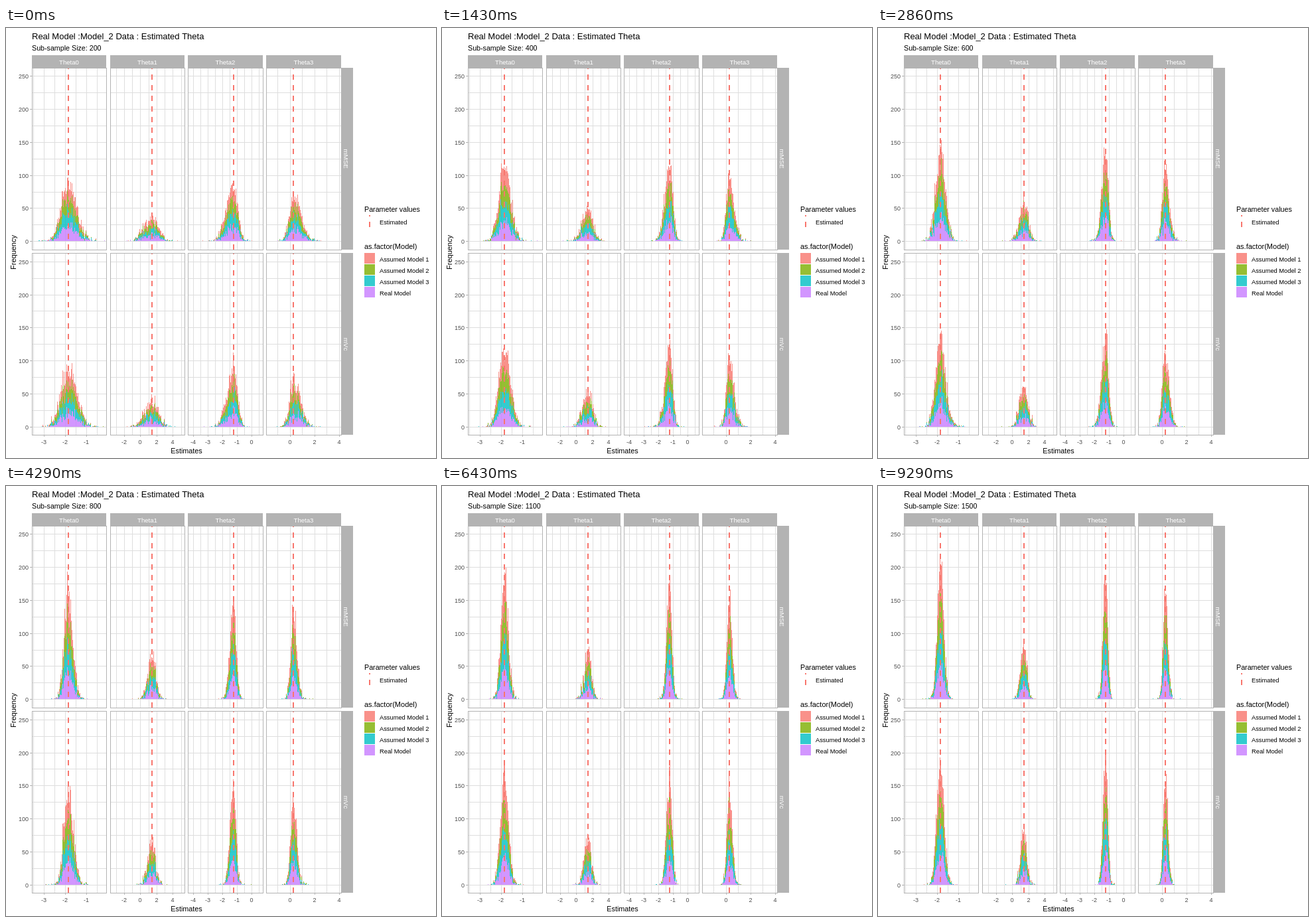
These frames come from a looping animation (648x648 px, 10000 ms). An HTML page with a canvas:

```html
<!DOCTYPE html>
<html lang="en">
<head>
<meta charset="utf-8">
<title>Estimated Theta</title>
<style>
  html, body { margin: 0; width: 100%; height: 100%; overflow: hidden; background: #fff; }
  canvas { display: block; width: 648px; height: 648px; }
</style>
</head>
<body>
<canvas id="stage" width="648" height="648"></canvas>
<script>
const ctx = document.getElementById('stage').getContext('2d');
const LOOP = 10000, STEPS = 14;
const PANEL_H = 274, BASELINE = 261.2, PX_PER_COUNT = 0.996;
const BIN = 0.02, DRAWS = 1000;
const GREY = '#b3b3b3', GRID = '#dedede', RED = '#f8766d';

// zero: pixel of value 0, unit: pixels per unit, mark: pixel of the true value,
// spread: per row, the deviation at n = 200 and its decay exponent
const columns = [
  { left: 39, right: 151, zero: 153, unit: 32, step: 0.5, labels: [-3, -2, -1], mark: 94,
    skew: 0.08, spread: [[0.36, 0.434], [0.36, 0.38]] },
  { left: 157, right: 269, zero: 202.4, unit: 12.25, step: 1, labels: [-2, 0, 2, 4], mark: 220,
    skew: -0.08, spread: [[0.86, 0.41], [0.82, 0.39]] },
  { left: 274, right: 387, zero: 370, unit: 22, step: 0.5, labels: [-4, -3, -2, -1, 0], mark: 343,
    skew: -0.25, spread: [[0.37, 0.44], [0.35, 0.39]] },
  { left: 392, right: 505, zero: 427.9, unit: 18.45, step: 1, labels: [0, 2, 4], mark: 433,
    skew: 0.28, spread: [[0.45, 0.43], [0.43, 0.4]] }
];
const rows = [{ top: 60, name: 'mMSE' }, { top: 339.5, name: 'mVc' }];

// Stacked from the bottom up; wide is the share of heavy-tailed estimates.
const models = [
  { name: 'Real Model', color: '#c77cff', wide: 0.04 },
  { name: 'Assumed Model 3', color: '#00bfc4', wide: 0.09 },
  { name: 'Assumed Model 2', color: '#7cae00', wide: 0.04 },
  { name: 'Assumed Model 1', color: '#f8766d', wide: 0.03 }
];

function seededRandom(seed) {
  return () => {
    seed = (seed + 0x6d2b79f5) | 0;
    let t = Math.imul(seed ^ (seed >>> 15), 1 | seed);
    t = (t + Math.imul(t ^ (t >>> 7), 61 | t)) ^ t;
    return ((t ^ (t >>> 14)) >>> 0) / 4294967296;
  };
}

function rect(x, y, w, h, color) {
  ctx.fillStyle = color;
  ctx.fillRect(x, y, w, h);
}

function text(label, x, y, size, color = '#000', align = 'left', angle = 0) {
  ctx.save();
  ctx.translate(x, y);
  ctx.rotate(angle);
  ctx.font = `${size}px "Liberation Sans", Arial, sans-serif`;
  ctx.textAlign = align;
  ctx.fillStyle = color;
  ctx.fillText(label, 0, 0);
  ctx.restore();
}

// Dashes run upward from the bottom end.
function dashes(x, top, bottom) {
  for (let y = bottom; y > top; y -= 16) {
    const end = Math.max(top, y - 8);
    rect(x - 1, end, 2, y - end, RED);
  }
}

const countY = (top, count) => Math.round(top + BASELINE - count * PX_PER_COUNT);

function drawGrid(col, top) {
  for (let count = 0; count <= 250; count += 25) {
    rect(col.left, countY(top, count), col.right - col.left, 1, GRID);
  }
  for (let v = -6; v <= 6; v += col.step) {
    const x = Math.round(col.zero + v * col.unit);
    if (x > col.left && x < col.right) rect(x, Math.floor(top), 1, PANEL_H, GRID);
  }
}

function sampleBins(col, spread, n, random) {
  const [sigma, decay] = spread;
  const width = sigma * (n / 200) ** -decay;
  const skew = col.skew * Math.sqrt(200 / n);
  const center = (col.mark - col.zero) / col.unit;
  const bins = new Map();
  models.forEach((model, m) => {
    for (let i = 0; i < DRAWS; i++) {
      const z = Math.sqrt(-2 * Math.log(1 - random())) * Math.abs(Math.cos(2 * Math.PI * random()));
      const side = random() < (1 + skew) / 2 ? 1 : -1;
      const scale = random() < model.wide ? 1.8 : 1;
      const value = center + side * z * width * scale * (1 + side * skew);
      const key = Math.round(value / BIN);
      if (!bins.has(key)) bins.set(key, models.map(() => 0));
      bins.get(key)[m]++;
    }
  });
  return bins;
}

// Bars snap to whole pixels; those narrower than a pixel may vanish.
function drawBars(col, top, bins) {
  ctx.globalAlpha = 0.8;
  for (const [key, counts] of bins) {
    const edge = side => Math.round(col.zero + (key + side) * BIN * col.unit);
    const x = edge(-0.5), width = edge(0.5) - x;
    if (x <= col.left || x >= col.right) continue;
    let total = 0;
    counts.forEach((count, m) => {
      const bottom = countY(top, total);
      total += count;
      const y = countY(top, total);
      rect(x, y, width, bottom - y, models[m].color);
    });
  }
  ctx.globalAlpha = 1;
}

function drawPanel(col, row, n, random) {
  const { top } = row;
  const edge = Math.floor(top);
  drawGrid(col, top);
  drawBars(col, top, sampleBins(col, col.spread[rows.indexOf(row)], n, random));
  dashes(col.mark, edge, edge + PANEL_H);
  ctx.strokeStyle = GREY;
  ctx.strokeRect(col.left + 0.5, edge + 0.5, col.right - col.left, PANEL_H);
}

function drawAxes() {
  columns.forEach((col, i) => {
    const width = col.right - col.left;
    rect(col.left, 41, width, 19, GREY);
    text('Theta' + i, col.left + width / 2, 55, 9.6, '#fff', 'center');
    for (const v of col.labels) {
      const x = Math.round(col.zero + v * col.unit);
      rect(x, 613, 1, 3, GREY);
      text(v, x, 627, 9, '#4d4d4d', 'center');
    }
  });
  for (const { top, name } of rows) {
    rect(505, Math.floor(top), 18, PANEL_H, GREY);
    text(name, 509, top + PANEL_H / 2, 9.8, '#fff', 'center', Math.PI / 2);
    for (let count = 0; count <= 250; count += 50) {
      const y = countY(top, count);
      rect(36, y, 3, 1, GREY);
      text(count, 34, y + 4, 9, '#4d4d4d', 'right');
    }
  }
  text('Estimates', 272, 641, 10.8, '#000', 'center');
  text('Frequency', 15, 338, 11, '#000', 'center', -Math.PI / 2);
}

function drawLegend() {
  text('Parameter values', 540, 277, 10.7);
  dashes(548, 282, 300);
  text('Estimated', 563, 296, 9.3);
  text('as.factor(Model)', 540, 333, 11);
  [...models].reverse().forEach(({ name, color }, i) => {
    const y = Math.round(338.6 + i * 17.28);
    ctx.globalAlpha = 0.8;
    rect(540, y, 16, 16, color);
    ctx.globalAlpha = 1;
    text(name, 563, y + 13, 9.3);
  });
}

function draw(step) {
  const n = 200 + step * 100;
  const random = seededRandom(4100 + step);
  rect(0, 0, 648, 648, '#fff');
  text('Real Model :Model_2 Data : Estimated Theta', 39, 17, 13);
  text('Sub-sample Size: ' + n, 39, 34, 10.7);
  for (const row of rows) {
    for (const col of columns) drawPanel(col, row, n, random);
  }
  drawAxes();
  drawLegend();
}

// Steps begin on whole hundredths of a second.
const stepStart = step => Math.round(step * LOOP / STEPS / 10) * 10;

let shown = -1;
function tick() {
  const time = performance.now() % LOOP;
  let step = STEPS - 1;
  while (stepStart(step) > time) step--;
  if (step !== shown) draw(shown = step);
  requestAnimationFrame(tick);
}
tick();
</script>
</body>
</html>
```
